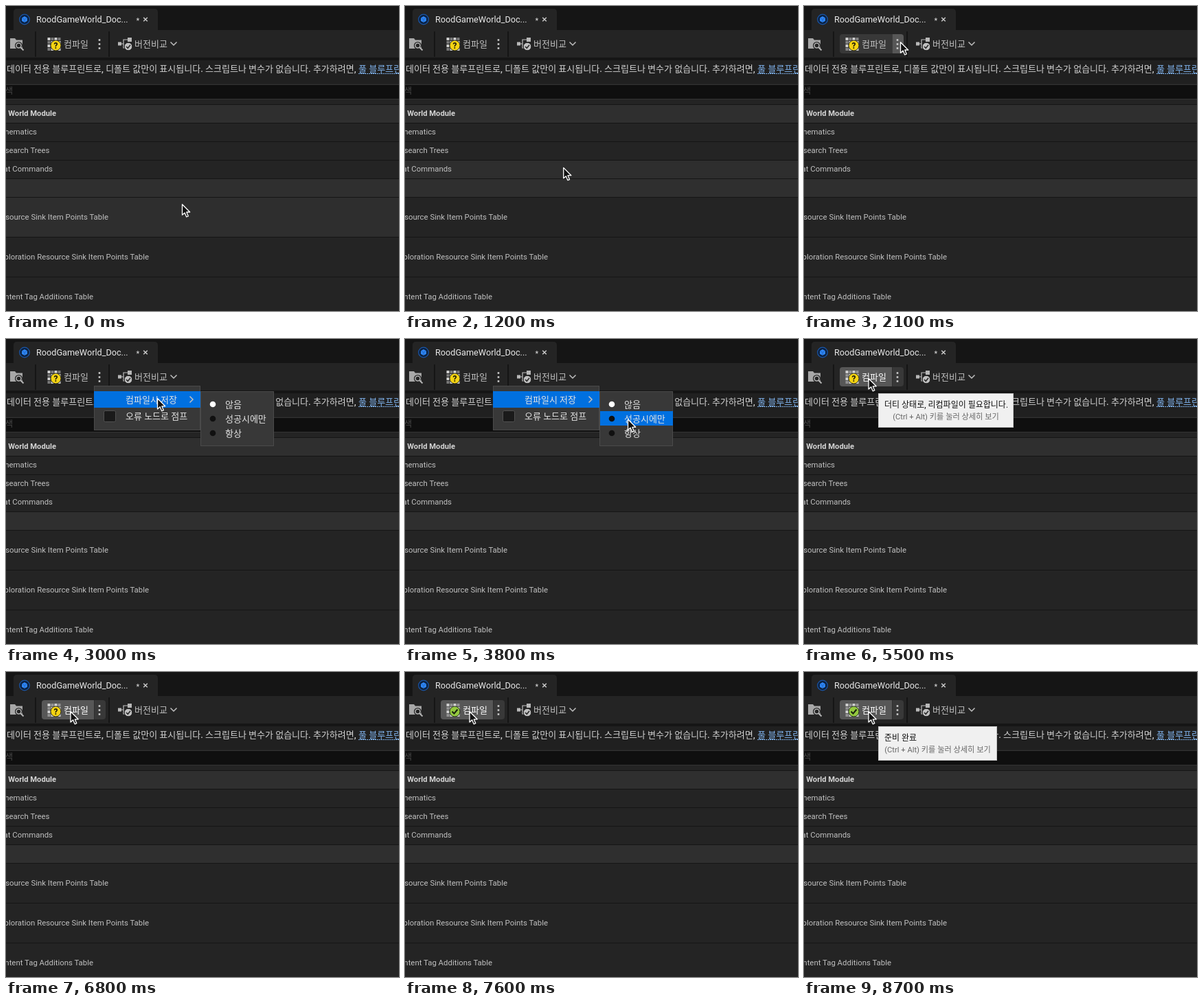
Recreate the animation shown at these times as an HTML page. Size 572 by 444 pixels, loop 8.9 s.

```html
<!DOCTYPE html>
<html lang="ko">
<head>
<meta charset="utf-8">
<style>
  html, body { margin: 0; width: 100%; height: 100%; overflow: hidden; background: #151515; }
  svg { display: block; width: 572px; height: 444px; }
  text { font-family: Roboto, 'Noto Sans CJK KR', 'Noto Sans CJK JP', sans-serif; font-size: 13px; fill: #c0c0c0; white-space: pre; }
  .row { font-size: 11.4px; text-anchor: end; }
  .head { font-size: 11.2px; font-weight: 700; fill: #d4d4d4; }
  .notice { font-weight: 500; fill: #d0d0d0; }
  .menu text { fill: #e4e4e4; }
  .line { fill: none; stroke: #c0c0c0; stroke-width: 1.5; }
</style>
</head>
<body>
<svg viewBox="0 0 572 444">
  <rect width="572" height="444" fill="#151515"/>
  <path d="M11 35V9q0-5 5-5H216q5 0 5 5V35Z" fill="#242424"/>
  <rect y="35" width="572" height="40" fill="#242424"/>

  <g id="tabIcon">
    <circle cx="27" cy="19.500" r="7.300" fill="#0b2140" stroke="#1a56a8" stroke-width="1.200"/>
    <path d="M27 15L31 17.300V21.700L27 24L23 21.700V17.300Z" fill="#2f86f5"/>
    <path d="M23 17.300L27 19.500L31 17.300M27 19.500V24" fill="none" stroke="#1c5cb4" stroke-width=".7"/>
  </g>
  <text x="44" y="24" style="font-size:12.7px;fill:#e8e8e8">RoodGameWorld_Doc...</text>
  <text x="189.500" y="24.500" style="font-size:11px;fill:#e0e0e0">*</text>
  <path d="M200.200 16.700L205.800 22.300M205.800 16.700L200.200 22.300" class="line" style="stroke:#c8c8c8"/>

  <g id="browseIcon">
    <path d="M6 47H13L15 49.500H24V62H6Z" fill="#a8a8a8"/>
    <circle cx="18.500" cy="57.500" r="5.500" fill="#242424"/>
    <circle cx="18.500" cy="57.500" r="3.500" class="line" style="stroke:#b4b4b4"/>
    <path d="M21 60L25.500 64.500" class="line" style="stroke:#b4b4b4;stroke-width:2"/>
  </g>
  <path d="M43 37V74M150 37V74" stroke="#151515" stroke-width="2"/>

  <path id="compileBg" d="M128 41V69H56q-4 0-4-4V45q0-4 4-4Z"/>
  <path id="optionsBg" d="M128.500 41H141q4 0 4 4V65q0 4-4 4H128.500Z"/>
  <g id="gridIcon" fill="#d0d0d0"></g>
  <g id="dirty">
    <circle cx="72.500" cy="57.500" r="7.500" fill="#f4d313" stroke="#2a2a1a"/>
    <text x="72.500" y="62" text-anchor="middle" style="font-weight:700;font-size:12px;fill:#17150a">?</text>
  </g>
  <g id="ready">
    <circle cx="72.500" cy="57.500" r="7.500" fill="#93c83e" stroke="#22301a"/>
    <path d="M68.500 57.500L71.500 60.500L76.500 54.500" fill="none" stroke="#182010" stroke-width="2"/>
  </g>
  <text id="compileText" x="84" y="59.500">컴파일</text>
  <path d="M134.700 48.200h2.600v2.600h-2.600zM134.700 54.200h2.600v2.600h-2.600zM134.700 60.200h2.600v2.600h-2.600z" fill="#d0d0d0"/>

  <g id="diffIcon">
    <path d="M168 55H171V49H177M171 55V61H174" class="line" style="stroke-width:1.200"/>
    <path d="M163 52.500h5v5h-5zM177 46h6v6h-6z" fill="#b8b8b8"/>
    <circle cx="178" cy="59" r="5.800" fill="#c0c0c0" stroke="#242424"/>
    <path d="M175 59L177.300 61.300L181 56.800" fill="none" stroke="#242424" stroke-width="1.500"/>
  </g>
  <text x="187" y="59.500">버전비교</text>
  <path d="M239.500 52.500L244 57L248.500 52.500" class="line"/>

  <rect y="79" width="572" height="34" fill="#202020"/>
  <text x="1" y="96" class="notice">데이터 전용 블루프린트로, 디폴트 값만이 표시됩니다. 스크립트나 변수가 없습니다. 추가하려면,</text>
  <text x="513" y="96" style="fill:#80b4ee">풀 블루프린트</text>
  <path d="M513 98.500H572" stroke="#80b4ee" stroke-dasharray="2 1"/>
  <rect y="113" width="572" height="30" fill="#242424"/>
  <rect x="-5" y="114.500" width="590" height="21" fill="#0f0f0f" stroke="#333"/>
  <text x="10" y="128" text-anchor="end" style="font-size:12px;fill:#484848">검색</text>

  <g id="rows"></g>

  <g id="menu" class="menu">
    <rect x="128.500" y="68.500" width="154" height="64" fill="#383838" stroke="#4a4a4a"/>
    <rect id="saveHover" x="128" y="76" width="155" height="24" fill="#0070e0"/>
    <text x="174" y="93">컴파일시 저장</text>
    <path d="M267.500 83.500L272 88L267.500 92.500" class="line"/>
    <rect x="142.500" y="104.500" width="17" height="16" rx="2" fill="#1a1a1a" stroke="#505050"/>
    <text x="174" y="117">오류 노드로 점프</text>
  </g>
  <g id="submenu" class="menu">
    <rect x="283.500" y="76.500" width="106" height="79" fill="#383838" stroke="#4a4a4a"/>
    <rect id="choiceHover" x="284" width="106" height="21" fill="#0070e0"/>
    <g id="choices"></g>
  </g>

  <g id="tip">
    <rect id="tipBox" x="108.500" y="79.500" height="49" fill="#f0f0f0" stroke="#c4c4c4"/>
    <text id="tipText" x="117" y="99.500" style="font-size:12px;fill:#111"></text>
    <text id="tipHint" y="117" text-anchor="middle" style="font-size:11.2px;fill:#666">(Ctrl + Alt) 키를 눌러 상세히 보기</text>
  </g>

  <path id="cursor" d="M0 0V15.500L3.600 12.300L6.200 18.300L8.800 17.200L6.300 11.300H11.200Z" fill="#111" stroke="#fff" stroke-width="1.300" stroke-linejoin="round"/>
</svg>
<script>
const LOOP = 8900, STEP = 100;
const $ = id => document.getElementById(id);
const show = (id, on) => $(id).style.display = on ? '' : 'none';

function add(parent, tag, attrs, label = '') {
  const node = document.createElementNS('http://www.w3.org/2000/svg', tag);
  for (const key in attrs) node.setAttribute(key, attrs[key]);
  node.textContent = label;
  return parent.appendChild(node);
}

for (let i = 0; i < 16; i++) {
  const col = i % 4, row = i >> 2;
  add($('gridIcon'), 'rect', {
    x: 60.5 + col * 5, y: 46 + row * 5, width: 4, height: 4,
    opacity: (col + row) % 2 ? .5 : 1
  });
}

// height, right edge of the label, label, heading
let nextTop = 144;
const rows = [
  [27, 73, 'Game World Module', true],
  [27, 45, 'Schematics'],
  [27, 63.5, 'Research Trees'],
  [27, 68, 'Chat Commands'],
  [27, 0, '', true],
  [58, 149, 'Resource Sink Item Points Table'],
  [58, 208, 'Exploration Resource Sink Item Points Table'],
  [58, 127, 'Content Tag Additions Table']
].map(([height, right, label, heading]) => {
  const top = nextTop;
  nextTop += height;
  const rect = add($('rows'), 'rect', { y: top, width: 572, height: height - 1, fill: heading ? '#2f2f2f' : '#242424' });
  add($('rows'), 'text', {
    x: right, y: top + Math.floor(height / 2) + 3,
    class: heading ? 'row head' : 'row'
  }, label);
  return { top, height, heading, rect };
});

['않음', '성공시에만', '항상'].forEach((label, i) => {
  add($('choices'), 'circle', { cx: 301, cy: 95 + 21 * i, r: 4.3, fill: i ? '#101010' : '#fff' });
  add($('choices'), 'text', { x: 319, y: 99.5 + 21 * i }, label);
});

const path = [
  [0, 256.5, 288.7], [900, 256.5, 288.7], [1800, 157, 83], [2100, 140.5, 52.7], [2400, 140.5, 52.7],
  [3000, 220.5, 86.5], [3300, 220.5, 86.5], [3800, 324.5, 117], [4200, 324.5, 117],
  [4900, 165, 84], [5200, 94, 57.5], [LOOP, 94, 57.5]
];

function cursorAt(t) {
  const i = path.findIndex(p => p[0] > t);
  const [t0, x0, y0] = path[i - 1], [t1, x1, y1] = path[i];
  const u = (t - t0) / (t1 - t0), e = u * u * (3 - 2 * u);
  return [x0 + (x1 - x0) * e, y0 + (y1 - y0) * e];
}

function draw(t) {
  const [x, y] = cursorAt(t);
  const within = (left, top, right, bottom) => x >= left && x < right && y >= top && y < bottom;
  const menu = t >= 2400 && t < 4100;
  const submenu = menu && t >= 2800;
  const compiled = t >= 6900;
  const onCompile = !menu && within(52, 41, 128, 70);
  const onOptions = !menu && within(128, 41, 146, 70);

  $('cursor').setAttribute('transform', `translate(${x} ${y})`);
  $('compileBg').setAttribute('fill', onCompile ? '#575757' : onOptions ? '#383838' : 'none');
  $('optionsBg').setAttribute('fill', onOptions ? '#575757' : onCompile ? '#383838' : 'none');
  $('compileText').style.fill = onCompile ? '#fff' : '#c0c0c0';
  show('dirty', !compiled);
  show('ready', compiled);

  for (const { top, height, heading, rect } of rows) {
    if (heading) continue;
    const hover = !menu && y >= top && y < top + height;
    rect.setAttribute('fill', hover ? '#2e2e2e' : '#242424');
  }

  show('menu', menu);
  show('submenu', submenu);
  show('saveHover', submenu || within(128, 76, 283, 100));
  const choice = Math.floor((y - 84) / 21);
  show('choiceHover', x >= 284 && choice >= 0 && choice < 3);
  $('choiceHover').setAttribute('y', 84 + 21 * choice);

  show('tip', t >= 5500 && t < 6700 || t >= 7900);
  const width = compiled ? 172 : 196;
  $('tipBox').setAttribute('width', width);
  $('tipText').textContent = compiled ? '준비 완료' : '더티 상태로, 리컴파일이 필요합니다.';
  $('tipHint').setAttribute('x', 108.5 + width / 2);
}

const start = performance.now();
function tick() {
  const t = (performance.now() - start) % LOOP;
  draw(Math.floor(t / STEP) * STEP);
  requestAnimationFrame(tick);
}
tick();
</script>
</body>
</html>
```
